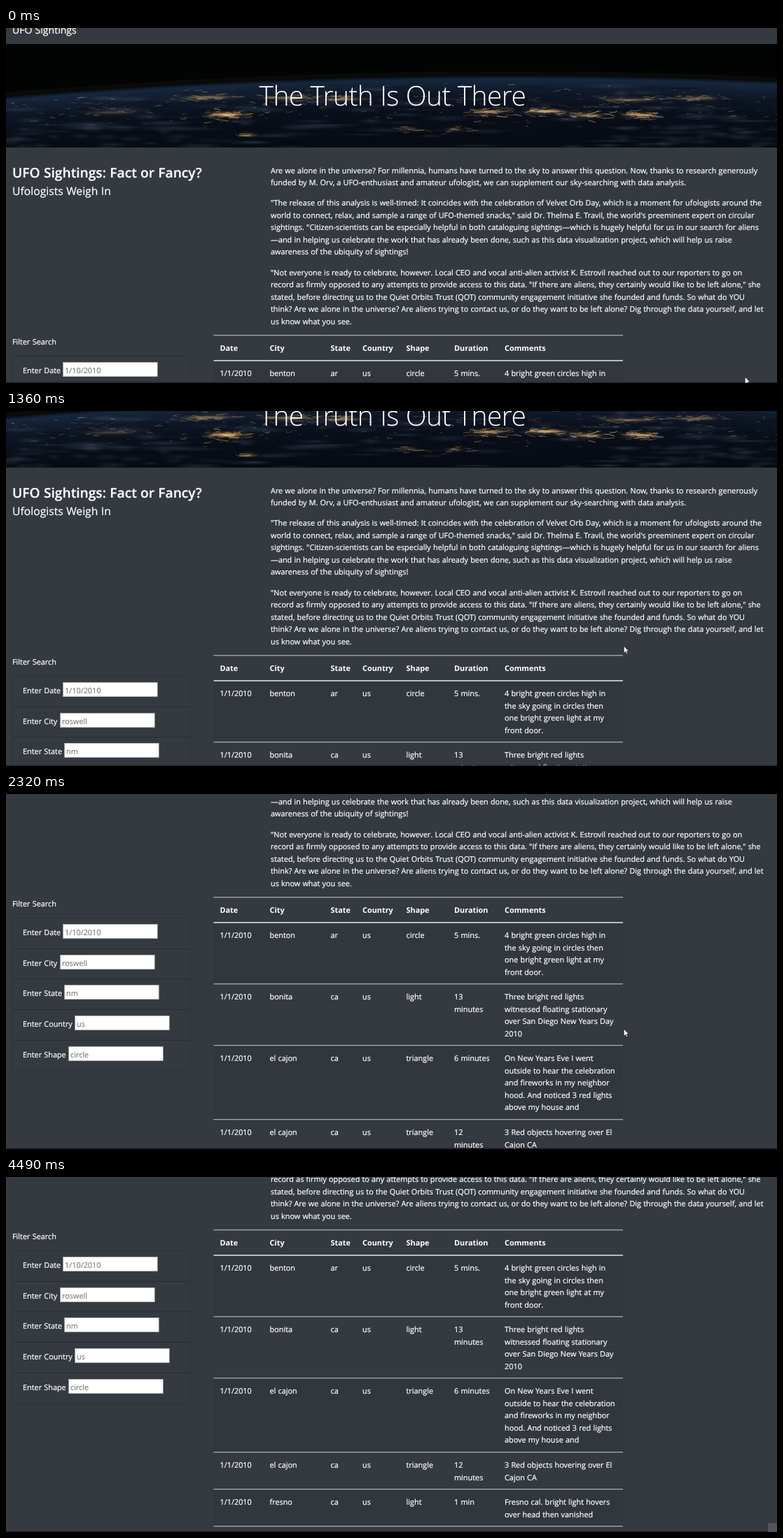
An HTML page with a canvas for the animation above (4.6 s loop, 1101 px wide and 508 px high).

```html
<!DOCTYPE html>
<html lang="en">
<head>
<meta charset="utf-8">
<title>UFO Sightings</title>
<style>
html, body { margin: 0; width: 100%; height: 100%; overflow: hidden; background: #343a40; }
#stage { position: absolute; left: 0; top: 0; width: 1101px; height: 508px; overflow: hidden; background: #343a40; }
#page { position: absolute; left: 0; top: 0; width: 1101px; height: 900px; animation: scroll 4600ms step-end infinite; }
#page > * { position: absolute; left: 0; top: 0; }
#page > #sky { top: 23px; }
text {
  font: 10.88px "Open Sans", "Noto Sans", sans-serif;
  word-spacing: .34px; fill: #fff; stroke: #fff; stroke-width: .22px; white-space: pre;
  text-rendering: geometricPrecision;
}
.brand { font-size: 14.1px; }
.title { font-size: 39px; font-weight: 300; letter-spacing: -.6px; text-anchor: middle; stroke: none; }
.head { font-size: 19.2px; font-weight: 600; }
.sub { font-size: 15.7px; }
.bold { font-weight: 700; stroke: none; }
.hint { fill: #757575; stroke: #757575; stroke-width: .1px; }
.line { fill: #c9cdd1; }
.strong { fill: #f4f5f6; }
.stripe { fill: rgba(0, 0, 0, .05); }
.box { fill: none; stroke: rgba(0, 0, 0, .13); }
.field { fill: #fff; stroke: #a9abad; stroke-width: .6; }
#edge { position: absolute; left: 0; top: 506px; width: 1101px; height: 2px; background: rgba(35, 28, 42, .45); }
#corner {
  position: absolute; left: 1088px; top: 495px; width: 13px; height: 13px;
  background: #51565b; border-top-left-radius: 2px; opacity: 0;
  animation: corner 4600ms step-end infinite;
}
#cursor { position: absolute; left: 0; top: 0; overflow: visible; animation: point 4600ms step-end infinite; }
@keyframes scroll {
  0% { top: 0; }
  23.03% { top: -24px; }
  24.77% { top: -57px; }
  26.51% { top: -73px; }
  29.55% { top: -90px; }
  31.29% { top: -121px; }
  33.25% { top: -142px; }
  34.77% { top: -146px; }
  36.51% { top: -168px; }
  38.25% { top: -203px; }
  39.99% { top: -219px; }
  46.73% { top: -243px; }
  48.47% { top: -276px; }
  50.42% { top: -292px; }
  58.68% { top: -316px; }
  60.42% { top: -349px; }
  61.95%, 100% { top: -364px; }
}
@keyframes point {
  0% { transform: translate(1055px, 499px); }
  1.51% { transform: translate(1046px, 489px); }
  3.03% { transform: translate(1008px, 452px); }
  4.55% { transform: translate(949px, 396px); }
  6.29% { transform: translate(901px, 352px); }
  7.81% { transform: translate(882px, 336px); }
  65.42% { transform: translate(883px, 336px); }
  66.94% { transform: translate(884px, 336px); }
  73.9% { transform: translate(898px, 342px); }
  75.63% { transform: translate(931px, 354px); }
  77.16% { transform: translate(954px, 362px); }
  82.16% { transform: translate(963px, 374px); }
  83.9% { transform: translate(996px, 420px); }
  85.64% { transform: translate(1050px, 497px); }
  87.16%, 100% { transform: translate(1060px, 525px); }
}
@keyframes corner {
  0% { opacity: 0; }
  97.6%, 100% { opacity: 1; }
}
</style>
</head>
<body>
<div id="stage">
  <div id="page">
    <canvas id="sky" width="1101" height="148"></canvas>
    <svg id="sheet" width="1101" height="900"></svg>
  </div>
  <div id="edge"></div>
  <div id="corner"></div>
  <svg id="cursor" width="9" height="13">
    <path d="M.3 .3V10.4L2.6 8.3 4.1 11.7 5.7 11 4.2 7.7H7.4Z" fill="#fff" stroke="#111" stroke-width=".6"/>
  </svg>
</div>
<script>
const sheet = document.getElementById('sheet');

function add(tag, attrs, content) {
  const el = document.createElementNS('http://www.w3.org/2000/svg', tag);
  for (const key in attrs) el.setAttribute(key, attrs[key]);
  if (content) el.textContent = content;
  sheet.appendChild(el);
}
const text = (x, y, str, cls = '') => add('text', { x, y, class: cls }, str);
const rect = (x, y, width, height, cls) => add('rect', { x, y, width, height, class: cls });
const lines = (x, y, list) => list.forEach((str, i) => text(x, y + i * 17.5, str));

// Headings and article
text(9, 8, 'UFO Sightings', 'brand');
text(552, 111, 'The Truth Is Out There', 'title');
text(9, 214, 'UFO Sightings: Fact or Fancy?', 'head');
text(9, 239, 'Ufologists Weigh In', 'sub');

lines(378, 207.7, [
  'Are we alone in the universe? For millennia, humans have turned to the sky to answer this question. Now, thanks to research generously',
  'funded by M. Orv, a UFO-enthusiast and amateur ufologist, we can supplement our sky-searching with data analysis.'
]);
lines(378, 254.3, [
  '"The release of this analysis is well-timed: It coincides with the celebration of Velvet Orb Day, which is a moment for ufologists around the',
  'world to connect, relax, and sample a range of UFO-themed snacks," said Dr. Thelma E. Travil, the world\'s preeminent expert on circular',
  'sightings. "Citizen-scientists can be especially helpful in both cataloguing sightings\u2014which is hugely helpful for us in our search for aliens',
  '\u2014and in helping us celebrate the work that has already been done, such as this data visualization project, which will help us raise',
  'awareness of the ubiquity of sightings!'
]);
lines(378, 353.5, [
  '"Not everyone is ready to celebrate, however. Local CEO and vocal anti-alien activist K. Estrovil reached out to our reporters to go on',
  'record as firmly opposed to any attempts to provide access to this data. "If there are aliens, they certainly would like to be left alone," she',
  'stated, before directing us to the Quiet Orbits Trust (QOT) community engagement initiative she founded and funds. So what do YOU',
  'think? Are we alone in the universe? Are aliens trying to contact us, or do they want to be left alone? Dig through the data yourself, and let',
  'us know what you see.'
]);

// Filter form
text(9, 452.8, 'Filter Search');
[['Date', '1/10/2010', 81], ['City', 'roswell', 77], ['State', 'nm', 83], ['Country', 'us', 98], ['Shape', 'circle', 89]]
  .forEach(([name, hint, x], i) => {
    const y = Math.round(i * 43.7);
    rect(9.5, 469.5 + y, 254, 43.7, 'box');
    rect(x + .6, 478.4 + y, 134.6, 20.4, 'field');
    text(24, 493.6 + y, 'Enter ' + name);
    text(x + 3, 493.6 + y, hint, 'hint');
  });

// Results table
const cols = [305.5, 376.5, 463.5, 509, 571.5, 640, 712];
const rows = [
  [475, 'benton', 'ar', 'circle', ['5 mins.'],
    ['4 bright green circles high in', 'the sky going in circles then', 'one bright green light at my', 'front door.']],
  [563, 'bonita', 'ca', 'light', ['13', 'minutes'],
    ['Three bright red lights', 'witnessed floating stationary', 'over San Diego New Years Day', '2010']],
  [651, 'el cajon', 'ca', 'triangle', ['6 minutes'],
    ['On New Years Eve I went', 'outside to hear the celebration', 'and fireworks in my neighbor', 'hood. And noticed 3 red lights', 'above my house and']],
  [757, 'el cajon', 'ca', 'triangle', ['12', 'minutes'],
    ['3 Red objects hovering over El', 'Cajon CA']],
  [810, 'fresno', 'ca', 'light', ['1 min'],
    ['Fresno cal. bright light hovers', 'over head then vanished']]
];
const rule = (y, cls = 'line', h = 1) => rect(296.5, y + .3, 584.5, h, cls);

rule(439);
['Date', 'City', 'State', 'Country', 'Shape', 'Duration', 'Comments']
  .forEach((name, i) => text(cols[i], 461.7, name, 'bold'));
rows.forEach(([y, city, state, shape, duration, comments], i) => {
  const end = i < 4 ? rows[i + 1][0] : 863;
  if (i % 2 === 0) rule(y + 1, 'stripe', end - y - 1);
  const cells = [['1/1/2010'], [city], [state], ['us'], [shape], duration, comments];
  cells.forEach((cell, c) => lines(cols[c], y + 23.2, cell));
});
rows.forEach(([y], i) => i ? rule(y) : rule(y, 'strong', 1.4));
rule(863);

// Night side of the planet with city lights
const ctx = document.getElementById('sky').getContext('2d');
let seed = 11;
const rand = () => (seed = (seed * 16807) % 2147483647) / 2147483647;
const bell = () => rand() + rand() + rand() - 1.5;
const horizon = x => 47 + (x - 720) ** 2 * 5.8e-5;

function arc(dy, color, width) {
  ctx.beginPath();
  for (let x = -20; x <= 1121; x += 20) ctx.lineTo(x, horizon(x) + dy);
  ctx.strokeStyle = color;
  ctx.lineWidth = width;
  ctx.stroke();
}
function glow(x, y, rx, ry, color, alpha) {
  ctx.save();
  ctx.translate(x, y);
  ctx.scale(rx, ry);
  const g = ctx.createRadialGradient(0, 0, 0, 0, 0, 1);
  g.addColorStop(0, `rgba(${color},${alpha})`);
  g.addColorStop(1, `rgba(${color},0)`);
  ctx.fillStyle = g;
  ctx.fillRect(-1, -1, 2, 2);
  ctx.restore();
}
// A short, slightly bent thread of light
function streak(x, y, length, alpha) {
  if (y < horizon(x) + 6) return;
  const slope = bell() * .5;
  ctx.beginPath();
  ctx.moveTo(x, y);
  ctx.quadraticCurveTo(x + length / 2, y + bell() * 3, x + length, y + slope * length * .5);
  ctx.strokeStyle = `hsla(${30 + rand() * 10},65%,${55 + rand() * 25}%,${alpha})`;
  ctx.lineWidth = .5 + rand() * .7;
  ctx.stroke();
}

ctx.fillStyle = '#020303';
ctx.fillRect(0, 0, 1101, 148);
arc(-4, 'rgba(40,46,26,.2)', 8);
for (let d = 0; d < 110; d++) {
  const k = Math.exp(-d / 28) * Math.min(1, (d + 2) / 6);
  arc(d, `rgb(${6 + 20 * k},${10 + 34 * k},${18 + 52 * k})`, 2);
}
for (let i = 0; i < 260; i++) {
  const x = rand() * 1101, y = 60 + rand() * 88;
  if (y > horizon(x) + 10) glow(x, y, 12 + rand() * 40, 1.5 + rand() * 4, rand() < .45 ? '110,125,155' : '0,2,6', .08 + rand() * .16);
}
for (let i = 0; i < 45; i++) {
  glow((rand() < .4 ? 0 : 850) + rand() * 250, 118 + rand() * 30, 10 + rand() * 22, 2 + rand() * 3, '115,125,145', .14);
}
for (let i = 0; i < 260; i++) streak(rand() * 1101, 68 + bell() * 14 + rand() * 40, 2 + rand() * 9, .1 + rand() * .3);
// x, y, spread, strength
[[315, 101, 40, 1], [290, 76, 55, .5], [400, 77, 55, .45], [480, 79, 45, .5], [690, 97, 34, .75],
 [770, 96, 40, .85], [830, 102, 36, .65], [905, 101, 32, .7], [345, 129, 18, .3], [575, 121, 22, .25],
 [640, 122, 20, .25], [985, 78, 50, .4], [150, 98, 60, .25], [890, 80, 60, .4]]
  .forEach(([x, y, w, s]) => {
    glow(x, y, w, 6, '205,140,70', .35 * s);
    glow(x, y, w * .7, 2.6, '255,218,160', .85 * s);
    for (let i = 0; i < 36 * s; i++) streak(x + bell() * w - 5, y + bell() * 6, 4 + rand() * 14, .25 + rand() * .5 * s);
  });
</script>
</body>
</html>
```
